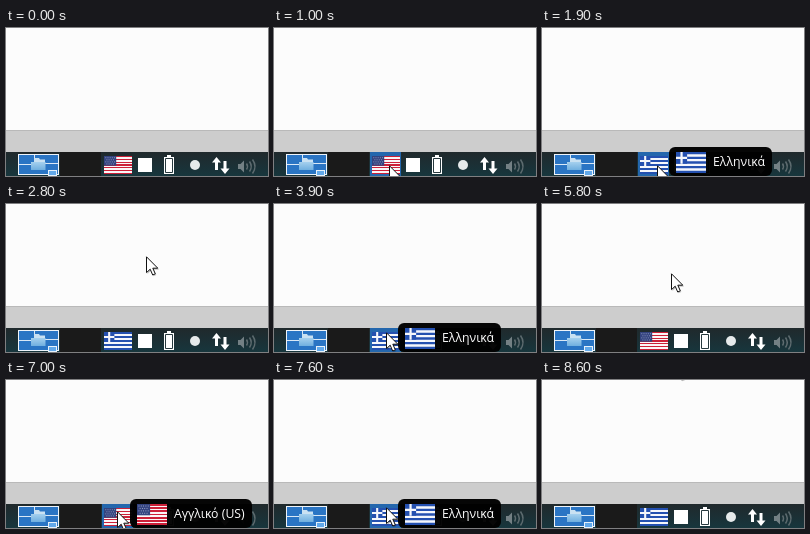
Write an HTML page that moves like this. It is 262 px wide and 148 px high and loops after 9000 ms.

```html
<!DOCTYPE html>
<html lang="el">
<head>
<meta charset="utf-8">
<title>Keyboard layout switcher</title>
<style>
  html, body { margin: 0; width: 100%; height: 100%; overflow: hidden; background: #fcfcfc; }
  svg { display: block; }
  text { font: 12.3px "Open Sans", "Noto Sans", sans-serif; fill: #fff; }
</style>
</head>
<body>
<svg id="stage" width="262" height="148" viewBox="0 0 262 148">
  <defs>
    <linearGradient id="bar" x2="0" y2="1">
      <stop offset="0" stop-color="#20292c"/>
      <stop offset="1" stop-color="#17363d"/>
    </linearGradient>
    <linearGradient id="folder" x2="0" y2="1">
      <stop offset="0" stop-color="#a5d0ee"/>
      <stop offset="1" stop-color="#6fafdf"/>
    </linearGradient>
    <symbol id="us" viewBox="0 0 39 26" preserveAspectRatio="none">
      <rect width="39" height="26" fill="#fbf6f7"/>
      <path d="M0 1H39M0 5H39M0 9H39M0 13H39M0 17H39M0 21H39M0 25H39" stroke="#cc2038" stroke-width="2" shape-rendering="crispEdges"/>
      <rect width="17" height="14" fill="#33437f"/>
      <path d="M2 2.5H16M3.5 5.5H15M2 8.5H16M3.5 11.5H15" stroke="#b9c0da" stroke-width="1.1" stroke-dasharray="1.1 1.9"/>
    </symbol>
    <symbol id="gr" viewBox="0 0 27 18" preserveAspectRatio="none">
      <rect width="27" height="18" fill="#f5f7fc"/>
      <path d="M0 1H27M0 5H27M0 9H27M0 13H27M0 17H27" stroke="#2450b0" stroke-width="2"/>
      <rect width="10" height="10" fill="#2450b0"/>
      <path d="M0 5H10M5 0V10" stroke="#f5f7fc" stroke-width="2"/>
    </symbol>
  </defs>

  <rect width="262" height="148" fill="#fcfcfc"/>
  <rect y="102" width="262" height="22" fill="#cdcdcd"/>
  <path d="M0 102.5H262" stroke="#b9b9b9"/>
  <rect y="124" width="262" height="24" fill="url(#bar)"/>
  <rect x="54" y="124" width="41" height="24" fill="#1a1a1a"/>

  <!-- workspace pager -->
  <rect x="12.5" y="126.5" width="40" height="20" fill="#2a75c4" stroke="#eef4fa"/>
  <path d="M13 136.5H26M28.5 127V131M39 135.5H52" stroke="#d9e8f6" fill="none"/>
  <path d="M28 130H33L34 131.5H39V141H28Z" fill="#c9e1f2"/>
  <path d="M25 134H39.5V142H25Z" fill="url(#folder)"/>
  <rect x="42.5" y="142.5" width="8" height="5" fill="#62a9ea" stroke="#e6f1fb"/>

  <!-- tray -->
  <rect id="glow" x="96" y="124" width="31" height="24" fill="#2467ad"/>
  <use id="flag" x="98" y="128" width="28" height="18"/>
  <rect x="132" y="130" width="14" height="14" fill="#fff"/>
  <path d="M161 127H165V129H168V146H158V129H161Z" fill="#fff"/>
  <path d="M159.5 130.5H166.5V144.5H159.5Z" fill="#fff" stroke="#26383d"/>
  <circle cx="189" cy="137" r="5" fill="#e6eaeb"/>
  <path d="M210.5 129L215 134.5H212V142H209V134.5H206ZM219 146L214.5 140.5H217.5V133H220.5V140.5H223.5Z" fill="#fff"/>
  <g stroke="#5d6b6f" fill="none" stroke-width="1.5">
    <path d="M232 136H234.5L238 132.5V144.5L234.5 141H232Z" fill="#738084" stroke="none"/>
    <path d="M240.5 135.5Q242.5 138.5 240.5 141.5M243.5 133.5Q247 138.5 243.5 143.5M246.5 131.5Q251.5 138.5 246.5 145.5"/>
  </g>

  <g id="tip">
    <rect id="tipBox" height="29" rx="6" fill="#000" fill-opacity=".97"/>
    <use id="tipFlag" x="7" y="5" width="30" height="21"/>
    <text id="tipText" x="44" y="19"></text>
  </g>

  <g id="cursor">
    <path d="M1.5 2V18L5 14.8L7.6 20.3L10.4 19L7.9 13.8H13Z" fill="#000" opacity=".22"/>
    <path d="M.5 .8V16.6L4.2 13.2L6.7 19L9.3 17.8L6.8 12.2H11.8Z" fill="#fff" stroke="#111"/>
  </g>
</svg>
<script>
  const LOOP = 9000, STEP = 100;
  const $ = id => document.getElementById(id);

  // time, x, y of the pointer tip
  const path = [
    [0, 199, -40], [100, 199, -40], [200, 199, -6], [1000, 115, 137],
    [2000, 115, 137], [2600, 145, 48], [2700, 145, 48], [2800, 140, 52],
    [3400, 112, 128], [4300, 112, 128], [4600, 132, 69], [5700, 132, 69],
    [5800, 129, 69], [6400, 111, 131], [7500, 111, 131], [7800, 113, 116],
    [7900, 113, 116], [8600, 133, -19], [9000, 133, -19]
  ];
  const layouts = [[0, "us"], [1800, "gr"], [4200, "us"], [7200, "gr"]];
  // from, to, layout, left edge
  const tips = [
    [1500, 1700, "us", 127], [1900, 2100, "gr", 127],
    [3900, 4100, "gr", 124], [4300, 4400, "us", 124],
    [7000, 7100, "us", 124], [7500, 7700, "gr", 124]
  ];
  const names = { us: ["Αγγλικό (US)", 122], gr: ["Ελληνικά", 103] };

  const ease = p => p * p * (3 - 2 * p);

  function pointer(t) {
    const i = Math.max(1, path.findIndex(k => k[0] >= t));
    const [t0, x0, y0] = path[i - 1], [t1, x1, y1] = path[i];
    const p = ease((t - t0) / (t1 - t0));
    return [x0 + (x1 - x0) * p, y0 + (y1 - y0) * p].map(Math.round);
  }

  const show = (el, on) => el.setAttribute("visibility", on ? "visible" : "hidden");
  const place = (el, x, y) => el.setAttribute("transform", `translate(${x} ${y})`);

  function draw(t) {
    const [x, y] = pointer(t);
    place($("cursor"), x, y);
    show($("glow"), y >= 124 && x >= 96 && x < 127);
    $("flag").setAttribute("href", "#" + layouts.filter(l => l[0] <= t).pop()[1]);

    const tip = tips.find(([from, to]) => t >= from && t < to);
    show($("tip"), tip);
    if (!tip) return;
    const [label, width] = names[tip[2]];
    place($("tip"), tip[3], 119);
    $("tipBox").setAttribute("width", width);
    $("tipFlag").setAttribute("href", "#" + tip[2]);
    $("tipText").textContent = label;
  }

  const start = performance.now();
  function frame() {
    const t = (performance.now() - start) % LOOP;
    draw(Math.floor(t / STEP) * STEP);
    requestAnimationFrame(frame);
  }
  frame();
</script>
</body>
</html>
```
